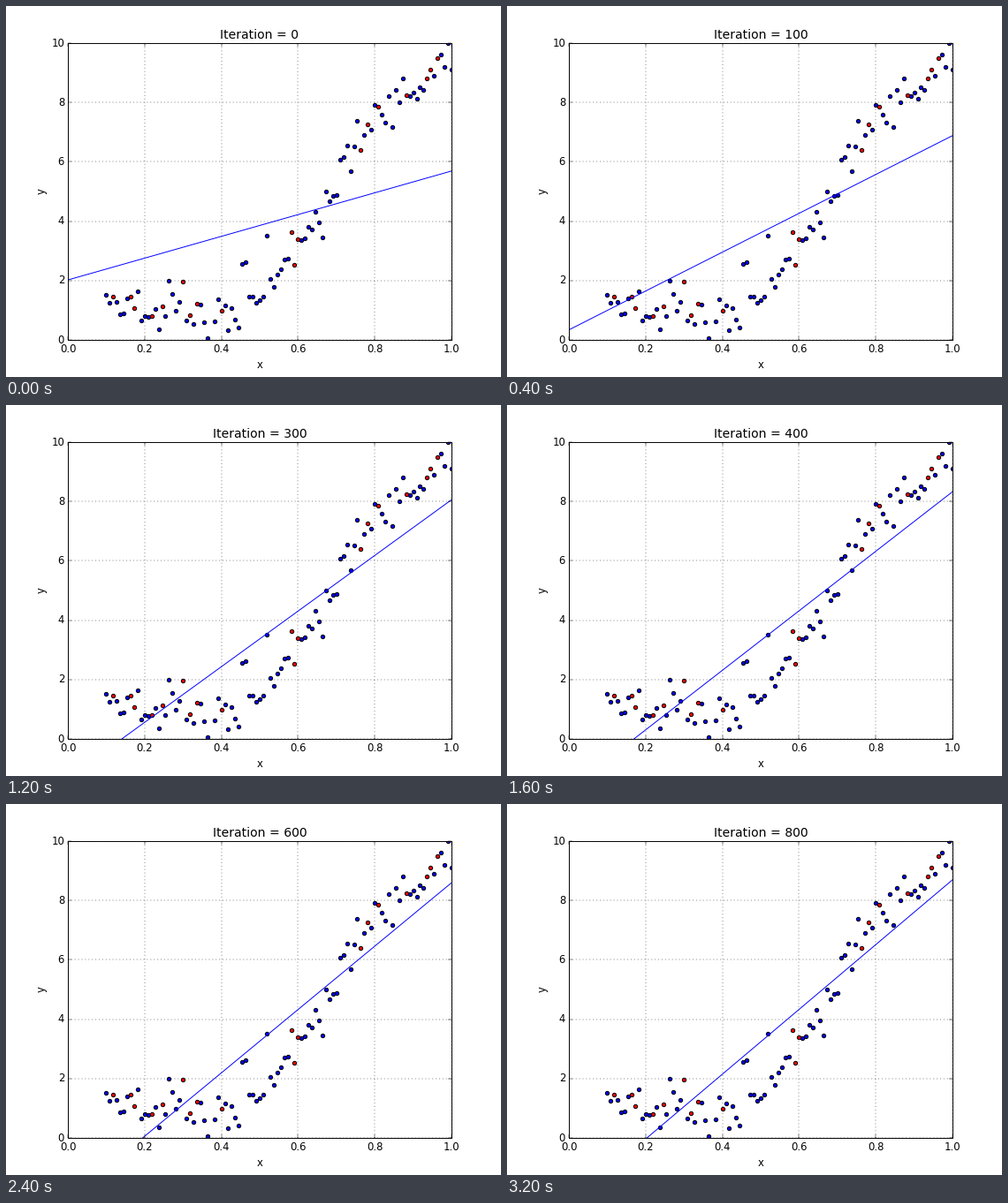
Animation of 560 by 420 pixels, one loop 6.2 s. Source, as a matplotlib script:

```python
import numpy as np
import matplotlib.pyplot as plt
from matplotlib.animation import FuncAnimation

plt.style.use("classic")
plt.rcParams["font.family"] = "DejaVu Sans"

STEP_MS = 200
FRAMES = 31
LAST_STEP = 16          # the fit stops here and the picture holds
ITERS_PER_STEP = 50

# Noisy samples on an even x grid; a few are held out and shown in red.
x = np.linspace(0.1, 1.0, 100)
y = np.array([
    1.53, 1.25, 1.47, 1.29, 0.87, 0.90, 1.41, 1.47, 1.08, 1.64,
    0.64, 0.79, 0.77, 0.79, 1.04, 0.36, 1.14, 0.79, 2.00, 1.56,
    0.98, 1.29, 1.95, 0.66, 0.83, 0.54, 1.22, 1.19, 0.60, 0.07,
    -0.50, 0.62, 1.37, 0.98, 1.16, 0.33, 1.08, 0.68, 0.42, 2.56,
    2.62, 1.45, 1.47, 1.25, 1.35, 1.46, 3.52, 2.05, 1.79, 2.19,
    2.37, 2.71, 2.74, 3.62, 2.53, 3.40, 3.35, 3.43, 3.82, 3.72,
    4.31, 3.97, 3.45, 5.00, 4.68, 4.85, 4.89, 6.06, 6.16, 6.56,
    5.68, 6.52, 7.38, 6.41, 6.89, 7.27, 7.08, 7.93, 7.85, 7.60,
    7.33, 8.20, 7.16, 8.41, 8.00, 8.81, 8.23, 8.20, 8.33, 8.12,
    8.51, 8.42, 8.81, 9.10, 8.90, 9.49, 9.61, 9.20, 10.00, 9.10,
])
held_out = np.zeros(len(x), dtype=bool)
held_out[[2, 7, 8, 13, 16, 22, 24, 26, 33, 53,
          54, 55, 73, 75, 78, 86, 92, 93, 95]] = True


def fit_ends(iteration):
    """Line heights at x = 0 and x = 1, converging geometrically."""
    left = 0.611 ** (iteration / 100)
    return [-2.305 + 4.325 * left, 8.755 - 3.065 * left]


fig, ax = plt.subplots(figsize=(8, 6), dpi=70, facecolor="white")
for mask, color in ((~held_out, "blue"), (held_out, "red")):
    ax.scatter(x[mask], y[mask], s=20, c=color, edgecolors="black", linewidths=1)
line, = ax.plot([0, 1], fit_ends(0), color="blue", linewidth=1)
ax.set(xlim=(0, 1), ylim=(0, 10), xlabel="x", ylabel="y")
ax.grid(True)
title = ax.set_title("Iteration = 0")


def update(frame):
    iteration = min(frame, LAST_STEP) * ITERS_PER_STEP
    line.set_ydata(fit_ends(iteration))
    title.set_text(f"Iteration = {iteration}")
    return line, title


anim = FuncAnimation(fig, update, frames=FRAMES, interval=STEP_MS,
                     repeat=True, repeat_delay=0, blit=False)
plt.show()
```
